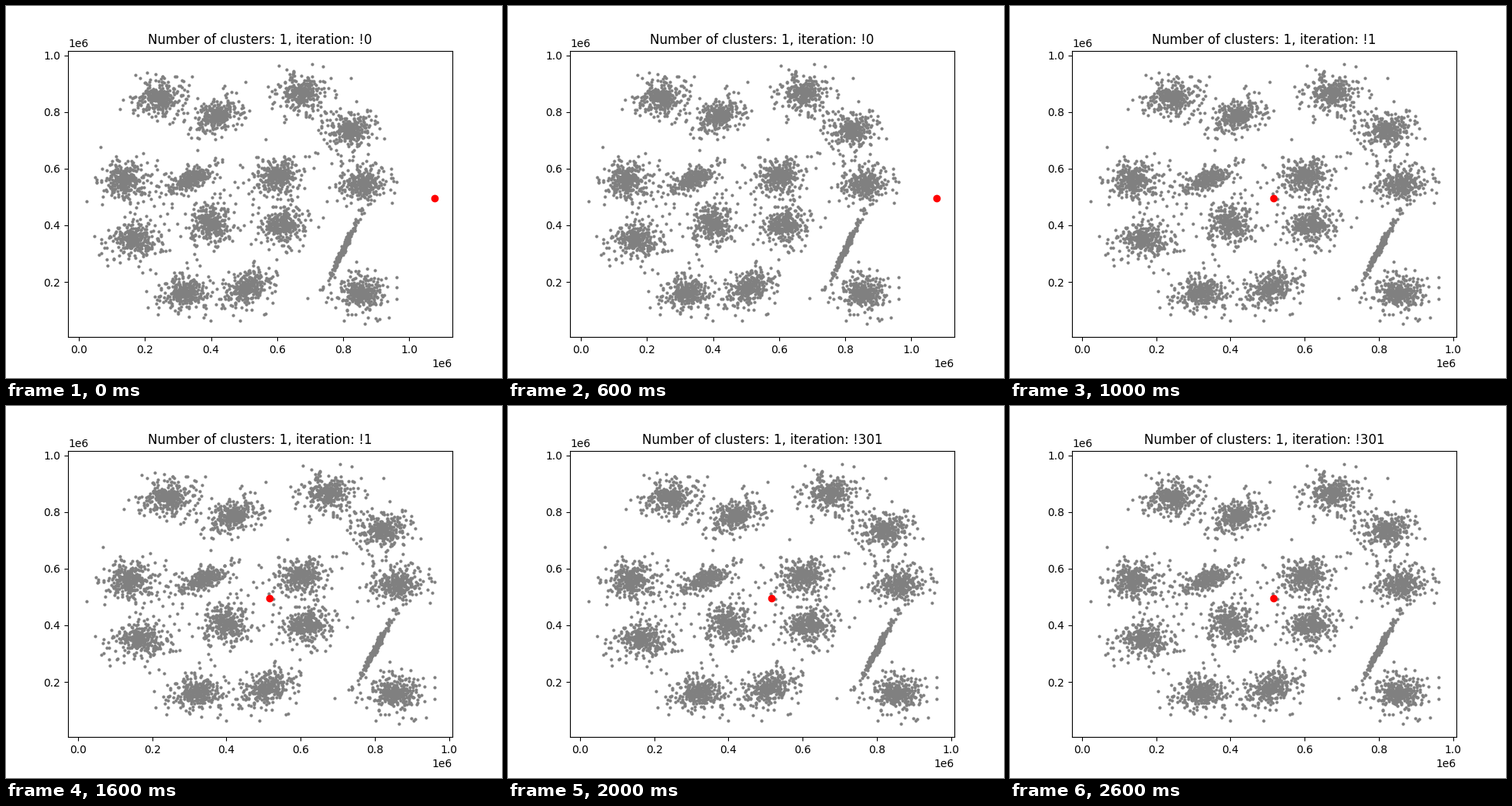
Recreate the animation shown at these times as a matplotlib script. Size 640 by 480 pixels, loop 3 s.

```python
import numpy as np
import matplotlib.pyplot as plt
from matplotlib.animation import FuncAnimation

K = 1000
RNG = np.random.default_rng(15)
PER_CLUSTER = 333

# Cluster centres (thousands)
ROUND = [
    (242, 848), (671, 865), (821, 736), (137, 562), (604, 574), (858, 546),
    (168, 348), (400, 405), (618, 400), (318, 164), (853, 160),
]
# Centre, spread and correlation of the slanted clusters (thousands)
SLANTED = [
    (418, 788, 34, 32, .3), (337, 562, 37, 22, .6),
    (801, 318, 18, 43, .985), (510, 181, 35, 33, .4),
]

X_RANGE = 19835, 961951
Y_RANGE = 51121, 970756

# (iteration, centroid x) for each step; the centroid's height is constant
STEPS = [(0, 1078 * K), (1, 517 * K), (301, 517 * K)]
CENTROID_Y = 495.5 * K


def cluster(cx, cy, sx=37, sy=33, rho=0):
    """Correlated cloud with a dense core and thin outskirts."""
    u, v = RNG.standard_normal((2, PER_CLUSTER)) * RNG.uniform(.3, 1.5, PER_CLUSTER)
    x = cx + sx * u
    y = cy + sy * (rho * u + np.sqrt(1 - rho ** 2) * v)
    return np.column_stack([x, y])


def padded(low, high):
    pad = .05 * (high - low)
    return low - pad, high + pad


points = K * np.vstack([cluster(*c) for c in ROUND + SLANTED])
x = np.clip(points[:, 0], *X_RANGE)
y = np.clip(points[:, 1], *Y_RANGE)

fig, ax = plt.subplots(figsize=(6.4, 4.8), dpi=100)
ax.plot(x, y, "o", color="gray", markersize=2)
centroid, = ax.plot([], [], "ro")
ax.set_ylim(padded(*Y_RANGE))


def update(i):
    iteration, cx = STEPS[i]
    centroid.set_data([cx], [CENTROID_Y])
    ax.set_xlim(padded(X_RANGE[0], max(X_RANGE[1], cx)))
    ax.set_title(f"Number of clusters: 1, iteration: !{iteration}")
    return centroid,


anim = FuncAnimation(fig, update, frames=len(STEPS), interval=1000, repeat=True)
plt.show()
```
